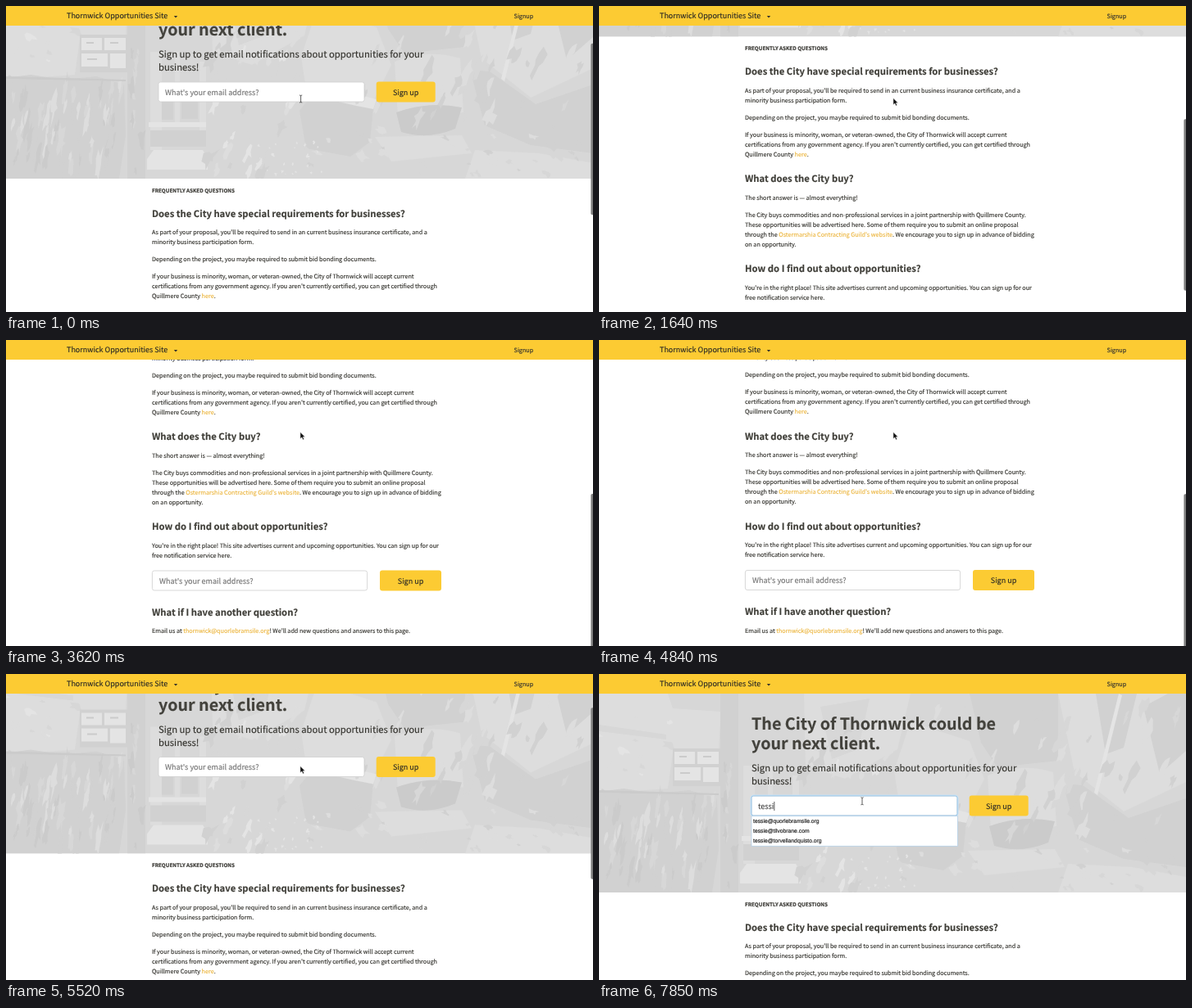
Write an HTML page that moves like this. It is 716x374 px and loops after 8 s.

```html
<!DOCTYPE html>
<html lang="en">
<head>
<meta charset="utf-8">
<title>Opportunities</title>
<style>
  html, body { margin: 0; width: 100%; height: 100%; overflow: hidden; background: #fff; }
  svg { display: block; width: 100vw; height: 100vh; }
  text {
    font-family: "Noto Sans CJK JP", "Noto Sans CJK SC", "Noto Sans CJK", "Open Sans", sans-serif;
    font-size: 7.21px; white-space: pre; text-rendering: geometricPrecision;
    color: #35342f; fill: currentColor; stroke: currentColor; stroke-width: .16px;
  }
  tspan { fill: currentColor; stroke: currentColor; }
  .h1 { font-size: 19.7px; font-weight: 700; color: #43423c; }
  .h2 { font-size: 11.28px; font-weight: 700; color: #3f3e38; }
  .lead { font-size: 11.26px; }
  .caps { font-size: 6.3px; font-weight: 700; }
  .field { font-size: 9.05px; color: #777; }
  .label { font-size: 9px; color: #2e2c25; }
  .typed { font-size: 9.05px; color: #4a4a4a; }
  .option { font: 6.78px "Liberation Sans", Arial, sans-serif; color: #222; }
  .link { color: #ecb640; }
</style>
</head>
<body>
<svg viewBox="0 0 716 374" preserveAspectRatio="none">
  <defs><clipPath id="heroClip"><rect y="-40" width="716" height="307"/></clipPath></defs>
  <rect width="716" height="374" fill="#fff"/>
  <g id="page">
    <g id="hero" clip-path="url(#heroClip)"></g>
    <g id="content"></g>
    <g id="focus">
      <rect x="185.2" y="148.2" width="252.6" height="25.6" rx="3.5" fill="none" stroke="#c9e2f5" stroke-width="1.6"/>
      <rect x="186" y="149" width="251" height="24" rx="2.5" fill="none" stroke="#8fc0e6" stroke-width=".8"/>
    </g>
    <g id="menu">
      <rect x="186" y="173.7" width="251.4" height="36.6" fill="#fff" stroke="#b4d0e8" stroke-width=".8"/>
    </g>
    <text id="typed" class="typed" x="194" y="164.5"></text>
    <rect id="caret" y="156" width=".8" height="11" fill="#333"/>
  </g>
  <rect width="716" height="24" fill="#fccb33"/>
  <text class="label" x="74" y="15.4">Thornwick Opportunities Site</text>
  <path d="M204.8 12h4.4l-2.2 2.4z" fill="#33312a"/>
  <text x="619.6" y="14.6">Signup</text>
  <rect id="thumb" x="713.4" width="4" height="209.5" rx="1.8" fill="#7d7d7d"/>
  <path id="arrow" d="M0 0v8.2l1.9-1.8 1.3 3 1.5-.7-1.3-2.8h2.5z" fill="#111" stroke="#fff" stroke-width=".5"/>
  <path id="beam" d="M-1.6-4.5q1.4 0 1.6.8q.2-.8 1.6-.8M0-3.7v7.4M-1.6 4.5q1.4 0 1.6-.8q.2.8 1.6.8" fill="none" stroke="#333" stroke-width=".8"/>
</svg>
<script>
const LOOP = 8000;
const $ = id => document.getElementById(id);
const add = (id, markup) => $(id).insertAdjacentHTML('beforeend', markup);

// Backdrop: a shop interior in flat greys
let seed = 11;
const rand = () => (seed = (seed * 16807) % 2147483647) / 2147483647;
const shade = { dark: '#cbcbcb', mid: '#d1d1d1', base: '#d7d7d7', soft: '#dddddd', light: '#e4e4e4' };
const shape = (tone, d) => add('hero', `<path d="${d}" fill="${shade[tone]}"/>`);

// Ragged patches scattered over a box; tall stretches them, lean shears them
function patches(count, x, y, w, h, size, tall, lean, tones) {
  for (let i = 0; i < count; i++) {
    const cx = x + rand() * w, cy = y + rand() * h, r = size * (0.4 + rand());
    const points = Array.from({ length: 11 }, (_, k) => {
      const angle = k / 11 * 2 * Math.PI, reach = r * (0.25 + rand() * 0.9);
      const dy = Math.sin(angle) * reach * tall;
      return (cx + Math.cos(angle) * reach + dy * lean).toFixed(1) + ' ' + (cy + dy).toFixed(1);
    });
    shape(tones[i % tones.length], 'M' + points.join('L') + 'z');
  }
}

shape('base', 'M0-40H716V267H0z');
shape('soft', 'M0 24H150L146 92 90 96 84 140 0 146z');
shape('base', 'M0 62L82 74V80L0 70zM84 24H148V46L90 42z');
patches(12, 0, 30, 90, 100, 8, 0.6, 0.3, ['light', 'base', 'soft']);
shape('mid', 'M90 91h58v46H90z');
shape('light', 'M92 95h25v15H92zM120 95h26v15h-26zM92 114h32v16H92zM127 114h19v18h-19z');
shape('dark', 'M98 100h9v2h-9zM127 100h10v2h-10zM99 120h12v2H99z');
shape('mid', 'M0 144L30 140 70 146 110 142 144 152 146 214 138 267H0z');
patches(64, 0, 152, 144, 108, 4, 4.5, -0.15, ['dark', 'base', 'mid', 'soft']);
shape('dark', 'M0 142L146 146v2L0 145z');
shape('mid', 'M148 24h22v243h-22z');
patches(10, 150, 40, 18, 220, 4, 3, 0, ['base', 'dark']);
shape('soft', 'M176 112H190V232H176zM206 112h6v86h-6zM236 124h8v90h-8zM178 156h66v6h-66z');
shape('light', 'M174 198h70v6h-70zM180 232h60l6 10v14h-74v-13z');
shape('mid', 'M190 165h14v30h-14zM214 166h20v28h-20zM176 208h68v20h-68z');
shape('soft', 'M250 24H380L364 92 300 128 252 112z');
shape('base', 'M270 40L330 30 316 92 284 104z');
patches(40, 246, 60, 110, 205, 7, 1.8, -0.3, ['mid', 'soft', 'base', 'light']);
shape('soft', 'M380 58L452 82 470 128 446 176 366 158 360 118z');
shape('mid', 'M358 184L374 164 448 180 444 222 420 240 366 230z');
shape('light', 'M366 152Q406 158 452 170L448 182Q404 174 366 162z');
shape('mid', 'M452 24H560V106L486 114 466 84z');
shape('soft', 'M474 124Q514 108 554 120L558 186 478 192z');
shape('dark', 'M476 186Q514 172 556 180L548 206Q514 220 482 210z');
shape('soft', 'M450 216L556 214 568 236 470 246z');
shape('soft', 'M560 24H716V132L640 168 580 120z');
shape('mid', 'M606 24h50l-16 66-22 8zM664 40l30-16h22v70l-32 28z');
shape('mid', 'M566 134L590 136 646 176 716 152V236L640 226 584 202z');
shape('soft', 'M572 232L650 236 716 248V267H560z');
shape('light', 'M634 24l4 2-30 122-4-3z');
patches(36, 356, 200, 352, 62, 6, 0.9, 0.5, ['mid', 'soft', 'base']);
patches(46, 370, 40, 340, 160, 6, 2.4, -0.35, ['soft', 'base', 'mid']);
patches(26, 300, 222, 90, 40, 2, 1.2, 0, ['light']);

// Page content; braces mark a link
const line = (cls, x, y, str) => add('content',
  `<text class="${cls}" x="${x}" y="${y}">${str.replace(/\{(.+?)\}/g, '<tspan class="link">$1</tspan>')}</text>`);
const para = (y, ...rows) => rows.forEach((row, i) => line('', 178, y + i * 12, row));
const heading = (y, str) => line('h2', 178, y, str);

function form(x, y, fieldWidth, buttonX, buttonWidth, pad, id) {
  add('content', `<rect x="${x}" y="${y}" width="${fieldWidth}" height="24" rx="2.5" fill="#fff" stroke="#cfcfcf" stroke-width=".8"/>
    <text class="field" id="${id}" x="${x + pad}" y="${y + 15.5}">What's your email address?</text>
    <rect x="${buttonX}" y="${y - 0.4}" width="${buttonWidth}" height="24.8" rx="3" fill="#fccb33"/>
    <text class="label" text-anchor="middle" x="${buttonX + buttonWidth / 2}" y="${y + 15.6}">Sign up</text>`);
}

line('h1', 186, 68, 'The City of Thornwick could be');
line('h1', 186, 92, 'your next client.');
line('lead', 186, 119.3, 'Sign up to get email notifications about opportunities for your');
line('lead', 186, 135, 'business!');
form(186, 149, 251, 451.7, 72, 8, 'prompt');
line('caps', 178, 283.8, 'FREQUENTLY ASKED QUESTIONS');
heading(313.6, 'Does the City have special requirements for businesses?');
para(335, "As part of your proposal, you'll be required to send in an current business insurance certificate, and a",
  'minority business participation form.');
para(368, 'Depending on the project, you maybe required to submit bid bonding documents.');
para(389, 'If your business is minority, woman, or veteran-owned, the City of Thornwick will accept current',
  "certifications from any government agency. If you aren't currently certified, you can get certified through",
  'Quillmere County {here}.');
heading(444.6, 'What does the City buy?');
para(466, 'The short answer is — almost everything!');
para(487, 'The City buys commodities and non-professional services in a joint partnership with Quillmere County.',
  'These opportunities will be advertised here. Some of them require you to submit an online proposal',
  "through the {Ostermarshia Contracting Guild's website}. We encourage you to sign up in advance of bidding",
  'on an opportunity.');
heading(554.8, 'How do I find out about opportunities?');
para(576, "You're in the right place! This site advertises current and upcoming opportunities. You can sign up for our",
  'free notification service here.');
form(178.4, 604.5, 262.2, 456, 75, 8.6, 'prompt2');
heading(659.2, 'What if I have another question?');
para(680.5, "Email us at {thornwick@quorlebramsile.org}! We'll add new questions and answers to this page.");
['quorlebramsile.org', 'tilvobrane.com', 'torvellandquisto.org'].forEach((host, i) =>
  add('menu', `<text class="option" x="188" y="${182.4 + i * 12}">tessie@${host}</text>`));

// Stepped timelines: [time, value...]
const scrollSteps = [[0, 56], [300, 88], [505, 132], [710, 151], [1220, 176], [1430, 214], [1640, 229.5],
  [2120, 246], [2320, 276], [2510, 294], [2710, 300.5], [3000, 320.5], [3150, 321.5], [3290, 322],
  [3620, 322.5], [3830, 323], [4980, 290], [5160, 195], [5340, 108], [5520, 47.5], [5730, 9], [5940, 0]];
const thumbSteps = [[0, 1], [4180, 0.5], [4390, 0], [4840, 1], [6280, 0.5], [6450, 0]];
const cursorSteps = [[0, 359.6, 113.5, 'beam'], [300, 358.9, 112.6, 'arrow'], [6280, 350, 128, 'arrow'],
  [6450, 332, 150, 'beam'], [6610, 321, 155.3, 'beam']];
const typingSteps = [[0, ''], [7400, 't'], [7550, 'te'], [7700, 'tes'], [7850, 'tessi']];
const at = (steps, t) => steps.findLast(step => step[0] <= t).slice(1);
const show = (id, on) => $(id).setAttribute('visibility', on ? 'visible' : 'hidden');

function render(t) {
  const [scroll] = at(scrollSteps, t);
  $('page').setAttribute('transform', `translate(0 ${-scroll})`);
  $('thumb').setAttribute('y', 16 + scroll * 0.533);
  $('thumb').setAttribute('opacity', at(thumbSteps, t)[0]);

  const [x, y, kind] = at(cursorSteps, t);
  for (const id of ['arrow', 'beam']) {
    show(id, id === kind);
    $(id).setAttribute('transform', `translate(${x} ${y})`);
  }

  const [typed] = at(typingSteps, t);
  const focused = t >= 6780;
  $('typed').textContent = typed;
  $('caret').setAttribute('x', 194.2 + (typed ? $('typed').getComputedTextLength() : 0));
  show('focus', focused);
  show('caret', focused);
  show('menu', typed);
  show('prompt', !typed);
}

const start = performance.now();
function tick() {
  render((performance.now() - start) % LOOP);
  requestAnimationFrame(tick);
}
tick();
</script>
</body>
</html>
```
